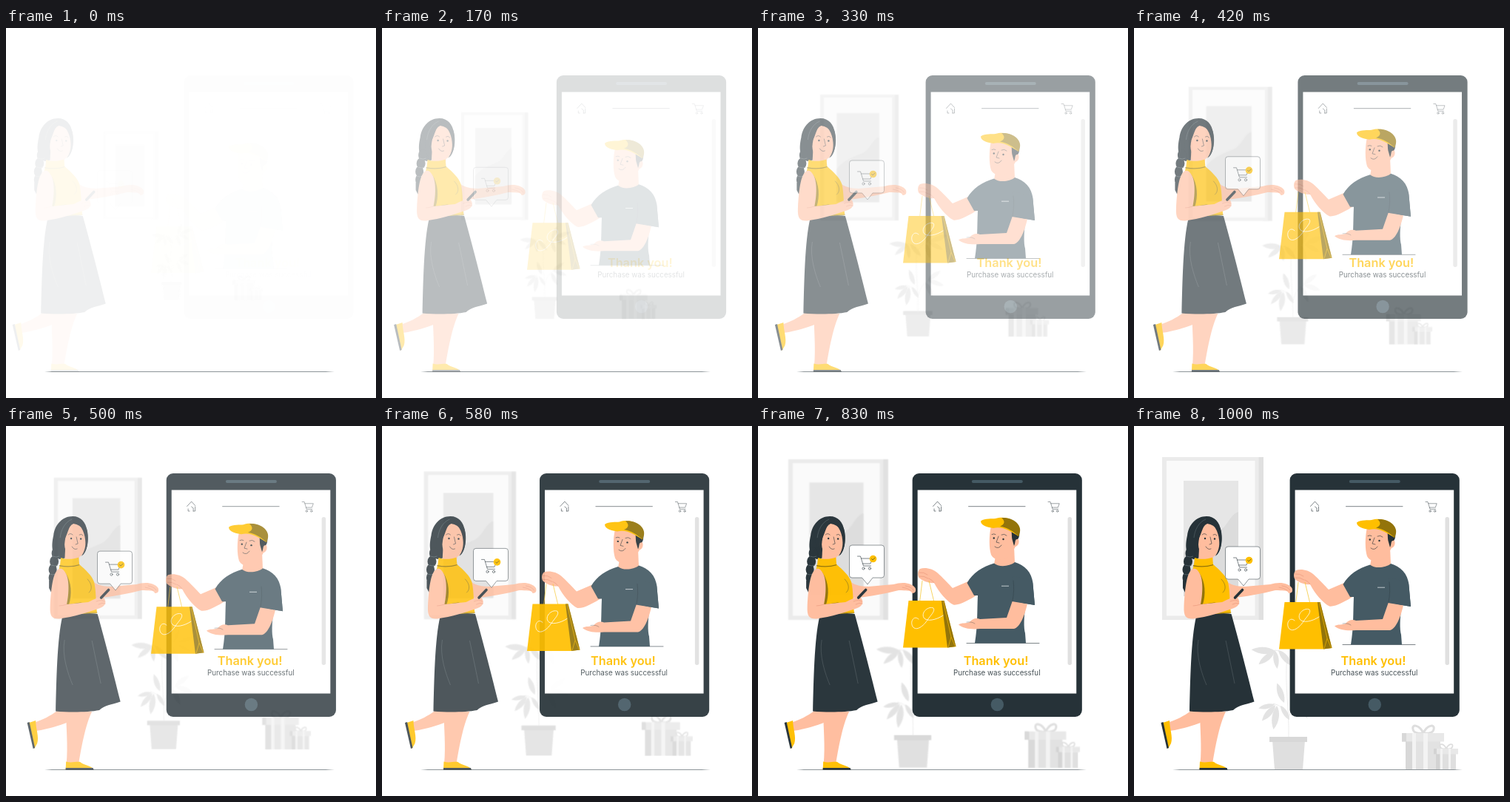
These frames come from a looping animation (500x500 px, 1040 ms). An HTML page:

```html
<!DOCTYPE html>
<html lang="en">
<head>
<meta charset="utf-8">
<title>Purchase was successful</title>
<style>
  html, body { margin: 0; width: 100%; height: 100%; overflow: hidden; background: #fff; }
  svg { display: block; width: 100vw; height: 100vh; --fade: 0; --pop: 0; }
  .room {
    opacity: var(--fade);
    transform: scale(calc(.5 + .5 * var(--fade)));
    transform-origin: 241px 254px;
  }
  .woman { opacity: var(--fade); transform: translateX(calc(30px * (var(--fade) - 1))); }
  .tablet { opacity: var(--pop); transform: translateX(calc(30px * (1 - var(--pop)))); }
  .rise { opacity: var(--pop); transform: translateY(calc(30px * (1 - var(--pop)))); }

  .dark { fill: #263238; }
  .slate { fill: #455a64; }
  .gold { fill: #ffbf00; }
  .shade { fill: #93740a; }
  .skin { fill: #ffbd9e; }
  .line { fill: none; stroke: #263238; stroke-width: .6; stroke-linecap: round; stroke-linejoin: round; }
  .soft { fill: none; stroke: #e08b70; stroke-width: .5; stroke-linecap: round; }
  .white { fill: none; stroke: #fff; stroke-width: .8; stroke-linecap: round; }
  text { font-family: Inter, "Open Sans", sans-serif; text-anchor: middle; }
</style>
</head>
<body>
<svg viewBox="0 0 500 500">
  <defs>
    <path id="leaf" d="M0 0C6 -6 17 -8 28 -3C20 3 9 4 0 0Z"/>
    <g id="cart" class="line">
      <path d="M0 0H4L8 13H18M5 3H20L17.500 10H7"/>
      <circle cx="8" cy="16.500" r="1.600"/>
      <circle cx="16.500" cy="16.500" r="1.600"/>
    </g>
    <g id="bow" fill="none" stroke="#dedede" stroke-width="3">
      <path d="M0 0C-5 -11 -16 -13 -14 -5C-13 0 -6 1 0 0C5 -11 16 -13 14 -5C13 0 6 1 0 0"/>
    </g>
  </defs>

  <g class="room">
    <path fill="#e0e0e0" d="M160 42H175V262H160Z"/>
    <path fill="#ebebeb" d="M38 42H168.500V262H38Z"/>
    <path fill="#fafafa" d="M44 47H163.500V256.500H44Z"/>
    <path fill="#e6e6e6" d="M67 74H141V230H67Z"/>
    <path fill="#dcdcdc" d="M141 116C129 120 127 136 113 144C96 151 80 156 67 172V230H141Z"/>

    <path fill="none" stroke="#e4e4e4" stroke-width=".7" d="M209 421C210 385 203 345 207 312M190 303Q203 303 207 318Q214 300 232 298M188 375Q203 378 209 394Q214 372 229 366"/>
    <g fill="#e3e3e3">
      <use href="#leaf" transform="translate(191 304) rotate(189) scale(1.150)"/>
      <use href="#leaf" transform="translate(190 304) rotate(146)"/>
      <use href="#leaf" transform="translate(190 303) rotate(88) scale(.9)"/>
      <use href="#leaf" transform="translate(195 303) rotate(55)"/>
      <use href="#leaf" transform="translate(230 299) rotate(-15) scale(1.150)"/>
      <use href="#leaf" transform="translate(228 300) rotate(34)"/>
      <use href="#leaf" transform="translate(222 302) rotate(78)"/>
      <use href="#leaf" transform="translate(224 301) rotate(-62)"/>
      <use href="#leaf" transform="translate(190 376) rotate(172) scale(.8)"/>
      <use href="#leaf" transform="translate(191 377) rotate(136)"/>
      <use href="#leaf" transform="translate(193 378) rotate(104) scale(1.150)"/>
      <use href="#leaf" transform="translate(198 378) rotate(64) scale(.8)"/>
      <use href="#leaf" transform="translate(203 374) rotate(-104)"/>
      <use href="#leaf" transform="translate(226 367) rotate(-32)"/>
      <use href="#leaf" transform="translate(227 367) rotate(24)"/>
      <use href="#leaf" transform="translate(222 370) rotate(70)"/>
    </g>
    <path fill="#dfdfdf" d="M187 425H231L228 464.500H190Z"/>
    <path fill="#d8d8d8" d="M183 420H234V427H183Z"/>

    <use href="#bow" x="391" y="415"/>
    <path fill="#e2e2e2" d="M367 426H414V465H367Z"/>
    <path fill="#e8e8e8" d="M362 415H419V426.500H362Z"/>
    <path fill="#d8d8d8" d="M367 426.500H376V465H367ZM362 415H368V426.500H362Z"/>
    <path fill="#f3f3f3" d="M376 415H381V465H376ZM391 415H397V465H391Z"/>
    <use href="#bow" transform="translate(422 436) scale(.6)"/>
    <path fill="#dfdfdf" d="M408 443H435V465H408Z"/>
    <path fill="#e8e8e8" d="M405 436H438V443.500H405Z"/>
    <path fill="#d3d3d3" d="M408 443.500H413V465H408ZM405 436H409V443.500H405Z"/>
    <path fill="#f3f3f3" d="M414 436H417V465H414ZM425 436H428V465H425Z"/>
  </g>

  <path fill="#8d9498" d="M52 465L62 464H432L444 465Z"/>

  <g class="tablet">
    <rect class="dark" x="210.600" y="64" width="229.200" height="329" rx="9"/>
    <path fill="#fff" d="M217.600 86.500H432.200V361.500H217.600Z"/>
    <rect class="slate" x="290.800" y="73" width="69" height="4" rx="2"/>
    <circle class="slate" cx="325.300" cy="376.500" r="8.700"/>
    <path class="line" d="M238.500 108.500L244.500 102L249.500 107.500M240 112V115H242M247 115V111L244.500 109M247 115H249.500V109"/>
    <path class="line" d="M286.500 108.700H363"/>
    <use href="#cart" transform="translate(394 102.500) scale(.76)"/>
    <rect x="420.500" y="123" width="5.500" height="200" rx="2.700" fill="#e0e0e0"/>
    <text class="gold" x="323.500" y="322.700" font-size="16.300" font-weight="600">Thank you!</text>
    <text class="dark" x="324.700" y="336.600" font-size="9.800" fill-opacity=".85">Purchase was successful</text>
  </g>

  <g class="rise">
    <path class="line" d="M282 295.500H380"/>
    <path class="skin" d="M284 212L298 229C286 237 271 245 264 243.500C256 240 244 226 238 214C231 215 222 211 217.500 207C215 203 216 197 219 195C226 192.500 236 195 242 200C250 207 258 216 263 221Z"/>
    <path class="soft" d="M218 200Q224 199 229 203M218 205Q224 204 230 208M231 208Q236 210 238 214"/>
    <path class="skin" d="M322 172L319 189C326 197 341 195 347 187L346 164Z"/>
    <path class="slate" d="M319 187.500C325 193 340 192 347 186C360 190 370 199 371.500 215L374 244L362 242C359 260 359 275 361 282L362 295.500H293C297 272 296 252 297 231L292 231L282.500 214C290 201 303 192 319 187.500Z"/>
    <path class="skin" d="M344 238L364 242.500C360 259 354 274 346 276L300 276C288 277 278 276 271 270.500C275 267.500 282 269 286 267C290 262 295 261 300 263L336 261Z"/>
    <path class="slate" d="M345 205L371 211L374 244L343 239Z"/>
    <path class="line" d="M344 238C346 228 346 219 345 211M282 267Q289 266 293 269" stroke-opacity=".55"/>
    <path d="M329 218.200H339" stroke="#dfe5e8" stroke-width=".8"/>

    <path class="skin" d="M315 137C312 150 312 167 315 176C319 184 331 185 340 178L348 165C354 163 354 154 349 152L345 137Z"/>
    <path class="dark" d="M341 139C344 145 342 151 344 157L346 164C348 160 347 155 350 155C353 155 354 147 353 142Z"/>
    <path class="gold" d="M301 130.500C307 126 316 128 321 127C333 123 351 128 354 143L352 151C341 144 331 137 318 140C311 139 301 137 301 130.500Z"/>
    <path class="shade" d="M329 126C346 125 356 136 354 145L352 151C345 144 336 139 327 137.500C334 135 334 130 329 126Z"/>
    <path class="line" d="M316 148.500Q319 147 321 148.500M329 149Q333 147 336 150M325 151L322 159L326 160M320 165Q325 169 329 163"/>
    <circle class="dark" cx="318.800" cy="153.500" r="1.200"/>
    <circle class="dark" cx="331.500" cy="155" r="1.200"/>

    <path d="M218.500 240L222 211M238 240L231 211" fill="none" stroke="#f5c93c" stroke-width=".8"/>
    <path class="gold" d="M203.500 238H251.500L267.500 300L256 301.500H196Z"/>
    <path class="shade" d="M248 238H251.500L267.500 300L256 301.500Z"/>
    <path d="M250 238L261 287L257 301M261 287L266.500 300" fill="none" stroke="#e0aa00" stroke-width=".9"/>
    <path class="white" d="M217 263C211 257 205 266 209 273C214 280 224 272 229 264C233 258 240 252 237 248C231 245 220 253 224 261C228 267 241 264 250 258"/>
  </g>

  <g class="woman">
    <path class="dark" d="M98 122C84 122 74 133 72 148C69 162 69 173 80 180L112 174C119 168 119 151 117.500 142C116 130 109 122 98 122Z"/>
    <g class="dark">
      <ellipse cx="75.500" cy="172" rx="6" ry="8"/>
      <ellipse cx="73" cy="183" rx="6" ry="7.500"/>
      <ellipse cx="71" cy="194" rx="5.500" ry="7.500"/>
      <ellipse cx="70" cy="205" rx="4.500" ry="7"/>
      <path d="M66 209L73 210L69 225L66 219Z"/>
    </g>
    <path d="M71 176Q76 178 80 176M69 188Q74 190 78 188M67 200Q71 202 75 200" fill="none" stroke="#718087" stroke-width=".5"/>
    <path class="skin" d="M119 205C127 213 135 217 150 217L184 214C195 210.500 208 211 213.500 219C215 224 213 226 209 226C208 221 201 223 191 222C175 226 150 231 128 233Z"/>
    <path class="soft" d="M200 216Q208 217 211 222M196 218Q203 219 207 222"/>

    <path class="skin" d="M77 385L121 387C97 400 66 410 48 412L45 401C58 397 67 392 77 385Z"/>
    <path class="skin" d="M89 384L124 386C115 404 109 438 106 457L89.500 457C92 432 89 406 89 384Z"/>
    <path class="gold" d="M39 401L48 398C48 409 53 420 50 429L46 436Z"/>
    <path class="dark" d="M36.500 401L39.500 400L47 435L44.500 436Z"/>
    <path class="gold" d="M89 453.500C96 456 103 453 108 454C114 459 124 459 126 464H88.500Z"/>
    <path class="dark" d="M88.500 462H125.500L126.500 464.800H88.500Z"/>

    <path class="dark" d="M84 258C97 253 119 252 131.500 254C140 284 152 330 162.500 372.500C150 377 141 377 134 384C119 387 92 387 75 385.500C76 345 77 287 84 258Z"/>
    <path d="M87 289C83 310 92 336 98 350M124 290L136 348" fill="none" stroke="#6c777c" stroke-width=".4"/>

    <path class="skin" d="M88 165L87 184H106L108 170Z"/>
    <path class="gold" d="M82 178C90 181 99 180 106 177.500L107 187C116 195 124 202 127 211C130 224 129 239 131 253C117 253 101 254 87 256C90 235 88 211 79 195L81 187Z"/>
    <path class="shade" d="M80 188Q94 191 107 187L107 188.200Q95 192 80 189.500ZM88 198C97 211 97 228 93 241L111 238L89 246C90 228 90 214 86 200Z"/>
    <path class="line" d="M118 207C124 213 125 221 120 225M87 255Q111 252 131 252" stroke-opacity=".6"/>
    <path class="skin" d="M80 193C72 196 69 215 67.500 244C67 257 70 261 80 260.500C99 258 121 251 135 246C143 243 144 237 140 232C132 231 126 235 119 238L90 241C93 227 94 207 88 198C86 195 84 192 80 193Z"/>
    <path class="soft" d="M130 237Q137 234 141 237M133 241Q138 238 142 240M90 241Q84 243 80 243"/>
    <path d="M136.500 232L146.500 221.500" stroke="#263238" stroke-width="3.600" stroke-linecap="round"/>

    <path class="skin" d="M99 132C91 136 88 148 87 160C87 171 95 178 103 178C112 177 116.500 167 116.500 154C116.500 143 111 134 99 132Z"/>
    <path class="dark" d="M101 127C93 132 92 145 87 153C84 162 85 169 83 174C76 162 78 138 87 130ZM99 128C108 132 114 142 115 154C116 163 114 169 110 176C120 167 120 149 117 139C112 128 105 126 99 128Z"/>
    <path d="M97 126C87 130 82 141 81 151" fill="none" stroke="#718087" stroke-width=".4"/>
    <path class="line" d="M92 147Q95 144 98 147M107 147Q110 145 112 148M103 150L105 159L102 160M97 163Q100 168 104 166"/>
    <circle class="dark" cx="96" cy="152" r="1.200"/>
    <circle class="dark" cx="109" cy="152.500" r="1.200"/>
  </g>

  <g class="rise">
    <path d="M127 163H167Q170.500 163 170.500 166.500V203.500Q170.500 207 167 207H155L148 216L140.500 207H127Q123.500 207 123.500 203.500V166.500Q123.500 163 127 163Z" fill="#fff" stroke="#263238" stroke-width=".5"/>
    <use href="#cart" x="134.500" y="178"/>
    <circle class="gold" cx="155.500" cy="181.500" r="4.800"/>
    <path class="line" d="M153.500 181.500L155 183L158 180"/>
  </g>
</svg>

<script>
  const LOOP = 1040, STEPS = 25, STEP = 1000 / 24;
  const stage = document.querySelector('svg');

  const bezier = (a, b, s) => 3 * (1 - s) ** 2 * s * a + 3 * (1 - s) * s * s * b + s ** 3;

  // cubic-bezier(.36, -.01, .5, 1.38), solved by bisection
  function overshoot(x) {
    let low = 0, high = 1;
    for (let i = 0; i < 24; i++) {
      const mid = (low + high) / 2;
      if (bezier(.36, .5, mid) < x) low = mid; else high = mid;
    }
    return bezier(-.01, 1.38, high);
  }

  function draw(now) {
    const step = Math.floor((now % LOOP + 4) / STEP);
    const p = Math.min(1, (step + 1.2) / STEPS);
    stage.style.setProperty('--fade', Math.sin(p * Math.PI / 2).toFixed(4));
    stage.style.setProperty('--pop', overshoot(p).toFixed(4));
  }

  const start = performance.now();
  function tick() {
    draw(performance.now() - start);
    requestAnimationFrame(tick);
  }
  tick();
</script>
</body>
</html>
```
